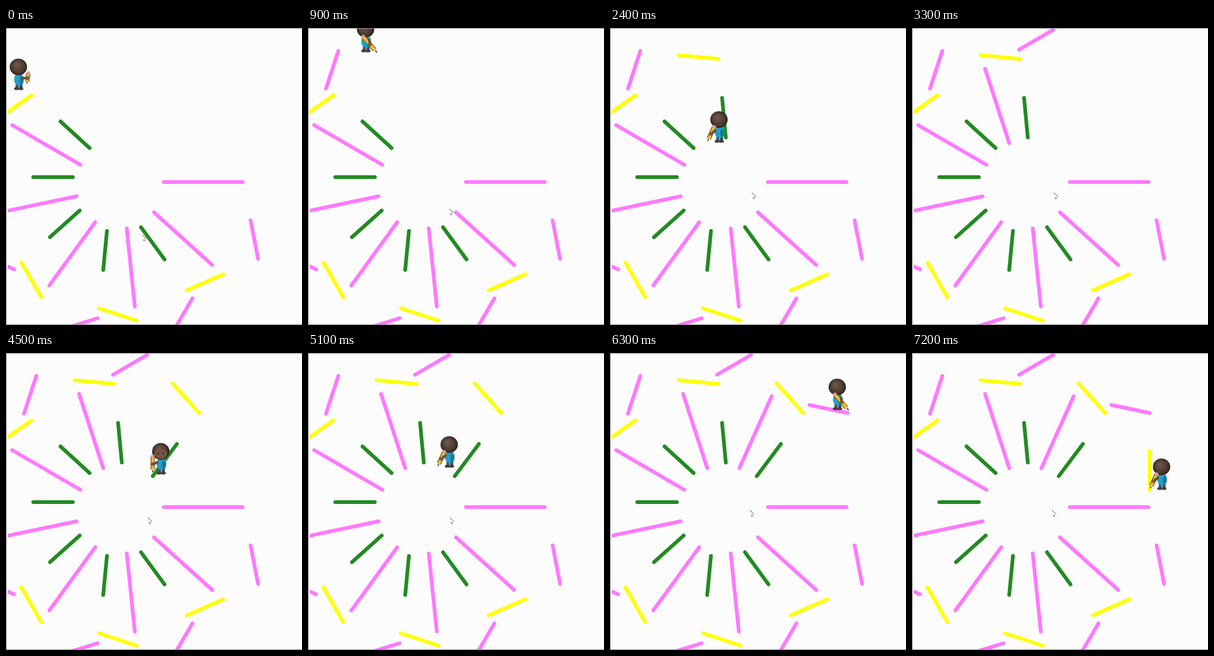
Write an HTML page with a canvas that moves like this. It is 478 px wide and 480 px high and loops after 7500 ms.

```html
<!DOCTYPE html>
<html lang="en">
<head>
<meta charset="utf-8">
<title>Line drawing</title>
<style>
html, body { margin: 0; width: 100%; height: 100%; overflow: hidden; background: #fcfcfc; }
canvas { display: block; }
</style>
</head>
<body>
<canvas id="stage" width="478" height="480"></canvas>
<script>
const ctx = document.getElementById('stage').getContext('2d');
const PINK = '#ff78ff', GREEN = '#228b22', YELLOW = '#ffff00';
const STEP = 300, LOOP = 7500;

// Lines present from the start: x1, y1, x2, y2
const base = {
  [PINK]: [
    [255, 249, 382, 249], [239, 298, 333, 383], [195, 324, 208, 450],
    [144, 314, 70, 416], [114, 272, -10, 298], [10, 157, 120, 221],
    [395, 311, 407, 373], [301, 437, 269, 492], [148, 469, 87, 488], [13, 390, -45, 364]
  ],
  [GREEN]: [
    [88, 151, 135, 194], [44, 241, 108, 241], [119, 295, 71, 338],
    [163, 328, 157, 391], [218, 322, 256, 374]
  ],
  [YELLOW]: [
    [41, 109, -11, 146], [25, 379, 57, 435], [150, 453, 211, 473], [292, 424, 351, 398]
  ]
};

// Lines added on the way: step, colour, x1, y1, x2, y2
const added = [
  [1, PINK, 29, 98, 49, 37], [4, YELLOW, 111, 44, 175, 50],
  [7, GREEN, 181, 113, 187, 177], [9, PINK, 157, 186, 118, 66],
  [11, PINK, 173, 35, 228, 3], [13, YELLOW, 269, 49, 312, 97],
  [15, GREEN, 276, 147, 237, 199], [18, PINK, 209, 186, 261, 70],
  [21, PINK, 322, 84, 384, 97], [24, YELLOW, 384, 159, 384, 222]
];

// Pen position and pose at each step
const walk = [
  [30, 98, 'B'], [49, 37, 'B'], [49, 37, 'R'], [110, 44, 'R'], [175, 50, 'R'],
  [175, 50, 'L'], [181, 113, 'L'], [187, 177, 'L'], [157, 186, 'L'],
  [118, 66, 'B'], [118, 66, 'B'], [228, 3, 'R'], [268, 49, 'R'], [312, 97, 'R'],
  [276, 147, 'F'], [237, 199, 'F'], [237, 199, 'L'], [209, 186, 'L'],
  [261, 70, 'B'], [261, 70, 'B'], [321, 84, 'R'], [384, 97, 'R'],
  [384, 97, 'L'], [384, 158, 'L'], [384, 222, 'L']
];

// Head centre and pencil ends, relative to the pen position
const poses = {
  B: { head: [-10, -35], pencil: [6, -25, 4, -9] },
  R: { head: [-17, -42], pencil: [-21, -30, 1, -5] },
  L: { head: [19, -38], pencil: [11, -26, 1, -4] },
  F: { head: [13, -40], pencil: [0, -32, 0, -7] }
};

function line(color, width, x1, y1, x2, y2, cap = 'round') {
  ctx.strokeStyle = color;
  ctx.lineWidth = width;
  ctx.lineCap = cap;
  ctx.beginPath();
  ctx.moveTo(x1, y1);
  ctx.lineTo(x2, y2);
  ctx.stroke();
}

function oval(color, x, y, rx, ry = rx) {
  ctx.fillStyle = color;
  ctx.beginPath();
  ctx.ellipse(x, y, rx, ry, 0, 0, 2 * Math.PI);
  ctx.fill();
}

function pencil(x1, y1, x2, y2) {
  const at = k => [x1 + (x2 - x1) * k, y1 + (y2 - y1) * k];
  line('#574515', 7, x1, y1, ...at(.85), 'butt');
  line('#eebc20', 5, x1, y1, ...at(.85), 'butt');
  line('#e5b58b', 3, ...at(.8), ...at(.95));
  line('#3a3020', 1.5, ...at(.93), x2, y2);
  oval('#e09a92', x1, y1, 3);
}

function artist(x, y, name) {
  const { head: [hx, hy], pencil: p } = poses[name];
  const back = name === 'B';
  ctx.save();
  ctx.translate(x, y);
  if (back) pencil(...p);
  ctx.save();
  ctx.translate(hx, hy);
  line('#38566b', 5, -2, 26, -2, 33);
  line('#2f4a5e', 5, 4, 26, 4, 33);
  oval('#4a4039', -3, 35, 4, 2.5);
  oval('#4a4039', 4, 35, 4, 2.5);
  oval('#249fc6', 1, 20, 8, 10);
  oval('#1b779b', 5, 22, 3, 7);
  const hair = ctx.createRadialGradient(-3, -4, 2, 0, 0, 14);
  hair.addColorStop(0, '#6b5548');
  hair.addColorStop(.7, '#4b3930');
  hair.addColorStop(1, '#2b211d');
  oval(hair, 0, 0, 14, 13.5);
  if (name === 'F') {
    oval('#765541', 0, 4, 10, 8);
    oval('#261c18', -4, 3, 1.3);
    oval('#261c18', 4, 3, 1.3);
  }
  ctx.restore();
  if (!back) pencil(...p);
  const handX = (p[0] + p[2]) / 2, handY = (p[1] + p[3]) / 2;
  line('#6b4b39', 4, hx + Math.sign(handX - hx) * 6, hy + 18, handX, handY);
  oval('#7b5743', handX, handY, 3);
  ctx.restore();
}

function pointer(step) {
  const stops = [[223, 338], [226, 322], [229, 307], [231, 296], [232, 283], [232, 270]];
  const [x, y] = step > 17 ? [229, 258] : stops[Math.min(step, 5)];
  line('#555', 1, x - 3, y - 4, x + 4, y + 3, 'butt');
  ctx.lineWidth = .8;
  ctx.strokeStyle = '#777';
  ctx.strokeRect(x - 1, y + 4, 2.5, 2);
}

function draw(now) {
  const step = Math.floor(now % LOOP / STEP);
  ctx.fillStyle = '#fcfcfc';
  ctx.fillRect(0, 0, 478, 480);
  ctx.save();
  ctx.beginPath();
  ctx.rect(3, 1, 475, 478);
  ctx.clip();
  for (const color in base) base[color].forEach(l => line(color, 6, ...l));
  for (const [start, color, ...l] of added) if (step >= start) line(color, 6, ...l);
  artist(...walk[step]);
  pointer(step);
  ctx.restore();
  ctx.fillStyle = '#8a8a8a';
  ctx.fillRect(0, 0, 478, 1);
  ctx.fillRect(0, 0, 1, 480);
  ctx.fillRect(0, 479, 478, 1);
  requestAnimationFrame(draw);
}
requestAnimationFrame(draw);
</script>
</body>
</html>
```
